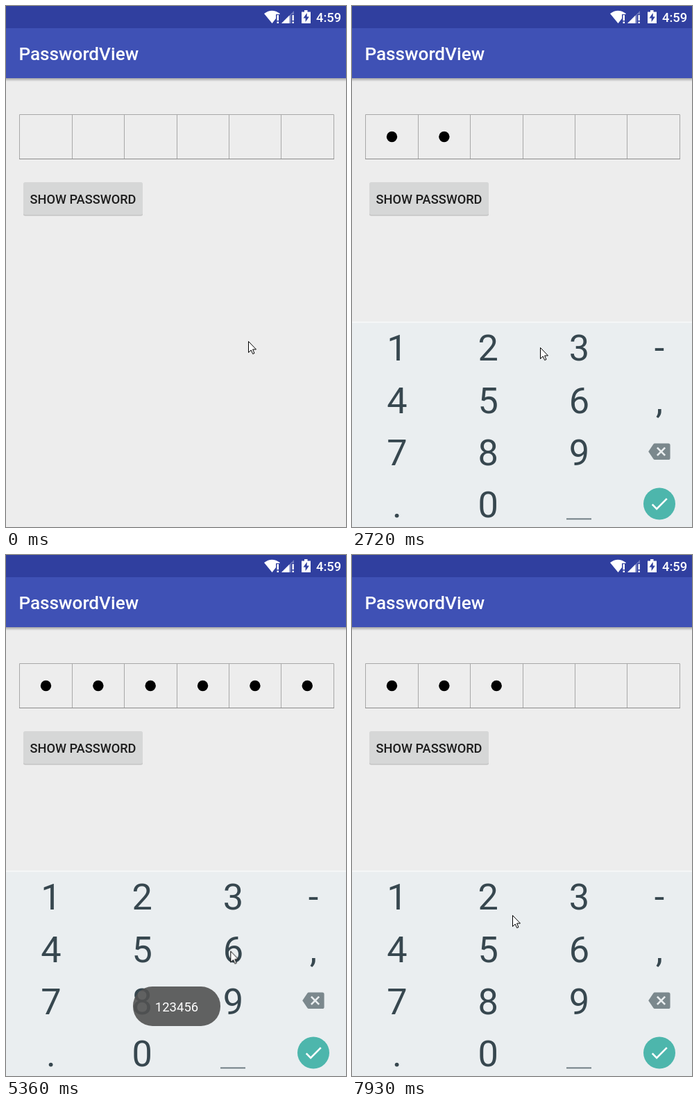
Recreate the animation shown at these times as an HTML page. Size 490 px wide and 751 px high, loop 7.99 s.

```html
<!DOCTYPE html>
<html lang="en">
<head>
<meta charset="utf-8">
<title>PasswordView</title>
<style>
  html, body { margin: 0; width: 100%; height: 100%; overflow: hidden; background: #ededed; }
  svg { display: block; width: 490px; height: 751px; }
  text { font-family: Roboto, sans-serif; }
  .medium { font-weight: 500; }
  .key { font-size: 52.3px; fill: #37474f; text-anchor: middle; }
</style>
</head>
<body>
<svg viewBox="0 0 490 751">
  <defs>
    <linearGradient id="shade" x2="0" y2="1">
      <stop offset="0" stop-color="#000" stop-opacity=".3"/>
      <stop offset="1" stop-color="#000" stop-opacity="0"/>
    </linearGradient>
  </defs>
  <rect width="490" height="751" fill="#ededed"/>

  <!-- app bar -->
  <rect y="104" width="490" height="5" fill="url(#shade)"/>
  <rect width="490" height="104" fill="#3f51b5"/>
  <rect width="490" height="32" fill="#303f9f"/>
  <text class="medium" x="18.400" y="78" font-size="26.140" fill="#fff">PasswordView</text>

  <!-- status icons -->
  <g fill="#fff">
    <path d="M372 11Q383 2.500 395 11L394 12H389V18L383.500 25Z"/>
    <path d="M390.500 13h2.500v8h-2.500zM390.500 22.500h2.500v2.500h-2.500z"/>
    <path d="M415 7V12H411V25H397Z" opacity=".3"/>
    <path d="M408.500 13.500V25H397Z"/>
    <path d="M412.500 13h2.300v8h-2.300zM412.500 22.500h2.300v2.500h-2.300z"/>
    <path d="M430 6h4.500v2.500h4.500v16.500h-13v-16.500h4z"/>
    <path d="M433.700 10L428.500 17.500H431.600V23L436.900 15.500H433.700Z" fill="#303f9f"/>
    <text class="medium" x="447" y="23" font-size="18.300">4:59</text>
  </g>

  <!-- password field -->
  <g id="field" fill="none" stroke="#a8a8a8">
    <path d="M19.500 220.500V156.500H472.500V220.500"/>
    <path d="M19 220.500H473" stroke="#8c8c8c"/>
  </g>

  <rect x="25" y="255.500" width="172" height="47" rx="2.500" fill="#000" opacity=".18"/>
  <rect x="25" y="254" width="172" height="47" rx="2.500" fill="#d6d7d7"/>
  <text class="medium" x="111" y="285" font-size="18.200" fill="#1d1d1d" text-anchor="middle">SHOW PASSWORD</text>

  <g id="keyboard">
    <rect y="455" width="490" height="300" fill="#eaeef0"/>
    <rect y="455" width="490" height="1.500" fill="#f8fafa"/>
    <g id="presses" fill="#cfd5d7"></g>
    <g id="keys"></g>
    <rect x="309" y="738.500" width="36" height="1.800" fill="#66757c"/>
    <g transform="translate(427.200 626.600) scale(1.307)" stroke-width="2">
      <path d="M22 3H7Q6 3 5.400 3.900L0 12L5.400 20.100Q6 21 7 21H22Q24 21 24 19V5Q24 3 22 3Z" fill="#7b888d"/>
      <path d="M9.700 7.700l8.600 8.600m0-8.600l-8.600 8.600" stroke="#eaeef0"/>
    </g>
    <circle cx="443" cy="717.500" r="23" fill="#4db6ac"/>
    <path d="M432.700 718.400L439.100 724.800L453.800 710.100" fill="none" stroke="#fff" stroke-width="2.600"/>
  </g>

  <g id="toast">
    <rect x="183" y="622" width="126" height="57" rx="28" fill="#525252" opacity=".9"/>
    <text x="246" y="658" font-size="18.500" fill="#fff" text-anchor="middle">123456</text>
  </g>

  <path id="pointer" d="M.5 .5V16.500L4.200 13L6.700 18.500L9 17.500L6.600 12H11.500Z" fill="#fff" stroke="#000"/>
</svg>
<script>
  const LOOP = 7990, HOLD = 60, HOP = 110;
  const byId = id => document.getElementById(id);

  function add(parent, tag, attrs, text = '') {
    const el = document.createElementNS('http://www.w3.org/2000/svg', tag);
    for (const name in attrs) el.setAttribute(name, attrs[name]);
    el.textContent = text;
    parent.append(el);
    return el;
  }

  // stops: [time in ms, style, easing towards the next stop]
  function track(el, stops) {
    const frames = stops.map(([time, style, easing = 'linear']) =>
      ({ offset: time / LOOP, easing, ...style }));
    frames.push({ ...frames[frames.length - 1], offset: 1 });
    el.animate(frames, { duration: LOOP, iterations: Infinity });
  }

  const show = (el, from, to) => track(el, [
    [0, { opacity: 0 }, 'step-end'],
    [from, { opacity: 1 }, 'step-end'],
    [to, { opacity: 0 }, 'step-end']
  ]);

  // keys
  const rowPitch = 75.3, columnPitch = 131.2;
  ['123-', '456,', '789', '.0'].forEach((row, r) => [...row].forEach((char, c) =>
    add(byId('keys'), 'text', {
      class: 'key', x: c < 3 ? 65 + c * columnPitch : 443, y: Math.round(511.4 + r * rowPitch)
    }, char)));

  function press(c, r, time) {
    const key = add(byId('presses'), 'rect', {
      x: 3.5 + c * columnPitch, y: 463.5 + r * rowPitch, width: c < 3 ? 122.5 : 92, height: 56.5
    });
    show(key, time, time + HOLD);
  }

  // type 1 to 6 with a short rest between the rows, then delete three
  const typed = i => 2260 + 240 * i + (i > 2 ? 100 : 0);
  const deleted = j => 6880 + 290 * j;
  const cell = 75.35;
  const hops = [];
  for (let i = 0; i < 6; i++) {
    const c = i % 3, r = Math.floor(i / 3);
    press(c, r, typed(i));
    if (i > 2) press(3, 2, deleted(5 - i));
    if (i) {
      const start = typed(i - 1) + HOLD;
      hops.push([start, start + HOP, 77 + 97 * c + 47 * r, 492 + 76 * r]);
      add(byId('field'), 'path', { d: `M${Math.floor(20 + i * cell) + 0.5} 157V220` });
    }
    const dot = add(byId('field'), 'circle', {
      cx: 57.5 + i * cell, cy: 188.5, r: 7.7, fill: '#000', stroke: 'none'
    });
    show(dot, typed(i) + HOLD, i < 3 ? LOOP : deleted(5 - i) + HOLD);
  }

  track(byId('keyboard'), [
    [0, { transform: 'translate(0px, 300px)', opacity: 0 }],
    [1520, { transform: 'translate(0px, 150px)', opacity: 0 }, 'ease-out'],
    [1740, { transform: 'translate(0px, 0px)', opacity: 1 }]
  ]);

  track(byId('toast'), [
    [0, { opacity: 0 }],
    [3720, { opacity: 0 }, 'cubic-bezier(.33, .67, .67, 1)'],
    [4070, { opacity: 1 }],
    [5740, { opacity: 1 }, 'cubic-bezier(.33, 0, .67, .33)'],
    [6240, { opacity: 0 }]
  ]);

  // pointer moves: start, end, x, y
  const moves = [
    [0, 0, 349, 483],
    [480, 1020, 261, 188],
    [1460, 2140, 77, 492],
    ...hops,
    [5310, 5420, 330, 574],
    [5720, 6290, 302, 550],
    [6470, 6810, 456, 653],
    [7520, 7930, 231, 519]
  ];
  const at = ([, , x, y]) => ({ transform: `translate(${x}px, ${y}px)` });
  track(byId('pointer'), moves.flatMap((move, i) => i
    ? [[move[0], at(moves[i - 1]), 'ease-in-out'], [move[1], at(move)]]
    : [[0, at(move)]]));
</script>
</body>
</html>
```
